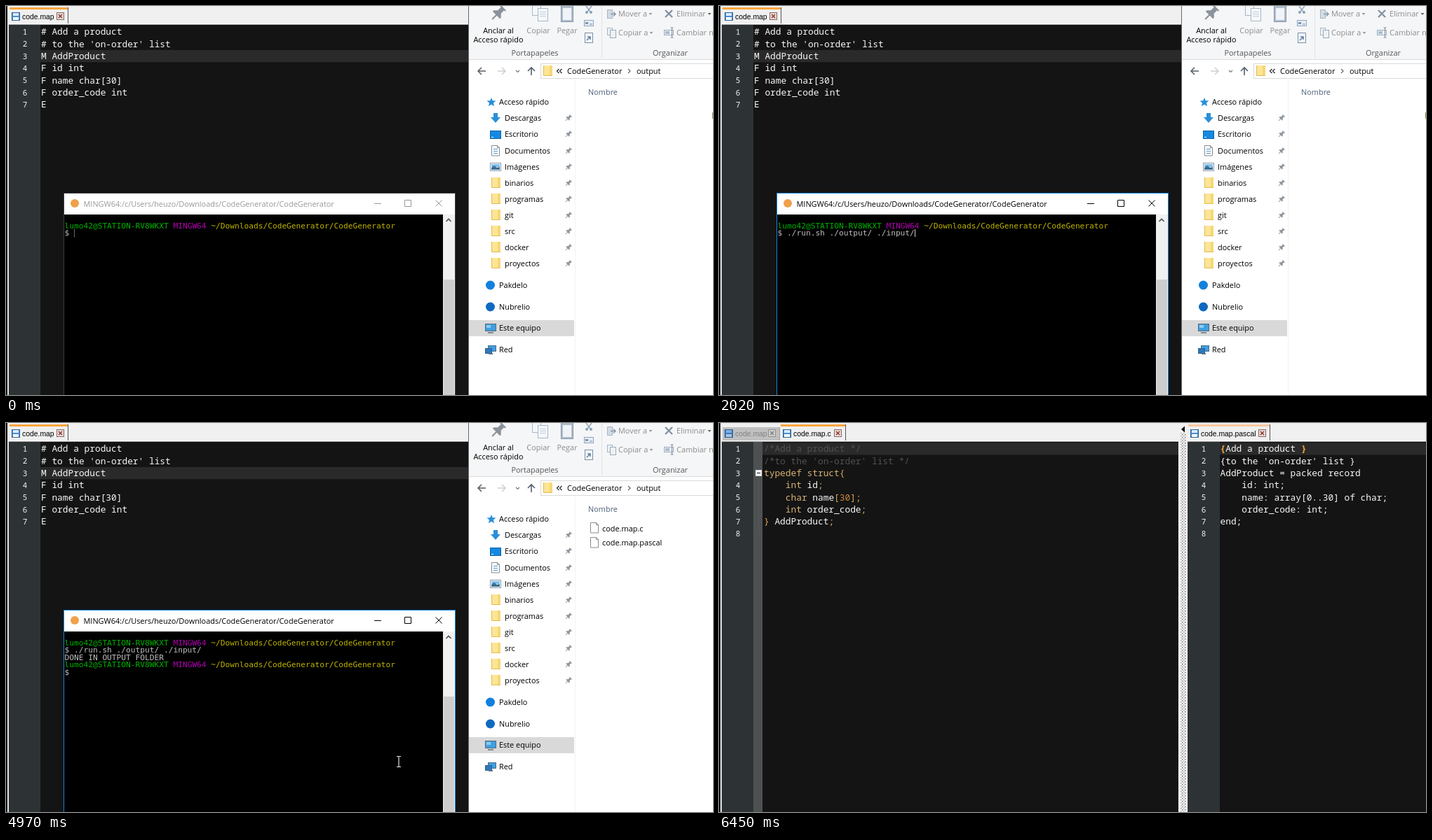
Write an HTML page that moves like this. It is 1008 px wide and 556 px high and loops after 8 s.

```html
<!DOCTYPE html>
<html lang="es">
<head>
<meta charset="utf-8">
<title>Code generator</title>
<style>
html, body { margin: 0; width: 100%; height: 100%; overflow: hidden; background: #141414; }
svg { display: block; width: 1008px; height: 556px; }
text { font: 10.92px "Open Sans", "Noto Sans", sans-serif; white-space: pre; }
.code { font: 12.83px "Noto Sans Mono", monospace; fill: #f8f8f8; }
.num { font: 11px "Noto Sans Mono", monospace; fill: #f4f4f4; text-anchor: middle; }
.term { font: 11.2px "DejaVu Sans Mono", monospace; fill: #bfbfbf; }
.tab { font: 10.4px "Liberation Sans", Arial, sans-serif; }
.mid { text-anchor: middle; }
.dim { fill: #8c8c8c; }
.group { fill: #555; text-anchor: middle; }
.key { fill: #d6b272; }
.op { fill: #dba95c; }
.val { fill: #c9843f; }
.note { fill: #555055; }
.brace { fill: #f9a83a; font-weight: bold; }
.user { fill: #00b400; }
.sys { fill: #b400b4; }
.path { fill: #bfb400; }
</style>
</head>
<body>
<svg id="stage" viewBox="0 0 1008 556"></svg>
<script>
const rect = (x, y, w, h, fill, more = '') =>
  `<rect x="${x}" y="${y}" width="${w}" height="${h}" fill="${fill}" ${more}/>`;
const frame = (x, y, w, h, fill, line) =>
  rect(x + .5, y + .5, w - 1, h - 1, fill, `stroke="${line}"`);
const line = (d, color, w = 1, more = '') =>
  `<path d="${d}" fill="none" stroke="${color}" stroke-width="${w}" ${more}/>`;
const shape = (d, fill) => `<path d="${d}" fill="${fill}"/>`;
const dot = (x, y, r, fill) => `<circle cx="${x}" cy="${y}" r="${r}" fill="${fill}"/>`;
// y is the middle of the line of text
const text = (x, y, s, cls = '', dy = 4) => `<text x="${x}" y="${y + dy}" class="${cls}">${s}</text>`;
const span = cls => s => `<tspan class="${cls}">${s}</tspan>`;
const group = (id, body) => `<g id="${id}">${body}</g>`;
const [key, op, val, note, brace, user, sys, path] =
  ['key', 'op', 'val', 'note', 'brace', 'user', 'sys', 'path'].map(span);

// ---- editor ----
const rowY = i => 37 + 17.33 * i;

function editor(x, end, margin, current, textX, lines, count = lines.length) {
  let s = rect(x, 0, end - x, 25, '#f0f0f0') + rect(x, 25, end - x, 1, '#fff') + rect(x, 26, end - x, 1, '#a0a0a0') +
    rect(x, 27, end - x, 529, '#141414') + rect(x, 27, margin - x, 529, '#2d3335') +
    rect(margin, rowY(current) - 8.7, end - margin, 17.33, '#2a2a2a');
  for (let i = 0; i < count; i++) s += text(x + 23, rowY(i), i + 1, 'num');
  lines.forEach((l, i) => s += text(textX, rowY(i), l, 'code', 4.3));
  return s;
}

function tab(x, end, label, top) {
  const w = end - x, y = top ? 2 : 6, ink = top ? '#000' : '#808080';
  const edge = top ? '#555' : '#a0a0a0', cx = end - 17;
  return rect(x, y, w, 25 - y, top ? '#f0f0f0' : '#c0c0c0') +
    (top ? rect(x, 2, w, 3, top) : '') + line(`M${end - .5} ${y}V25`, edge) +
    frame(x + 3, 9, 12, 12, top ? '#4a8fd0' : '#3c78c0', '#2f6194') +
    rect(x + 5, 10, 8, 4, top ? '#d8ecff' : '#7fb0e0') + rect(x + 5, 16, 8, 4, top ? '#fff' : '#a8c4e0') +
    text(x + 18, 15.5, label, 'tab', 3.5).replace('<text', `<text fill="${ink}"`) +
    frame(cx, 9, 11, 11, top ? '#e8dcd8' : '#d0d0d0', top ? '#8a6a64' : '#909090') +
    line(`M${cx + 3} 12l5 5m0-5l-5 5`, top ? '#8c3a30' : '#808080', 1.5);
}

const mapFile = editor(4, 659, 49, 2, 50, ['# Add a product', "# to the 'on-order' list",
  'M AddProduct', 'F id int', 'F name char[30]', 'F order_code int', 'E']) + tab(5, 89, 'code.map', '#faa53c');

// ---- file explorer ----
const folder = (x, y) => rect(x, y - 8, 13, 15, '#f7d774') + rect(x, y - 8, 9, 15, '#fce596') +
  line(`M${x + .5} ${y - 8}v14.5h12.5`, '#e3bb4f');
const page = (x, y) => shape(`M${x} ${y - 8}h8l4 4v12h-12z`, '#fff') +
  line(`M${x + .5} ${y - 7.5}h8l3 3v11.5h-11zM${x + 8.5} ${y - 7.5}v3h3`, '#8a8a8a');
const pin = (x, y, k = 1, c = '#8d959c') =>
  `<g transform="translate(${x} ${y}) rotate(45) scale(${k})">` +
  shape('M-2.5-5h5v1h-1v3l2 2v1h-7v-1l2-2v-3h-1zM-.5 2h1v4h-1z', c) + '</g>';
const screen = (x, y) => frame(x, y - 7, 16, 11, '#3f9fe0', '#5a6a78') +
  rect(x + 2, y - 5, 6, 4, '#8ccbf5') + rect(x + 4, y + 5, 8, 2, '#7c8a96');
const drop = (x, y, c = '#999') => shape(`M${x - 2.5} ${y - 1}h5l-2.5 3z`, c);

const ribbon = rect(660, 0, 348, 76, '#f5f6f7') + rect(660, 76, 348, 1, '#dadbdc') +
  rect(849, 0, 1, 74, '#e2e3e4') +
  pin(702, 10, 2.1, '#8a939b') +
  text(702, 35, 'Anclar al', 'mid') + text(702, 48, 'Acceso rápido', 'mid') + text(754, 67, 'Portapapeles', 'group') +
  frame(750, -3, 13, 17, '#f4f7fa', '#a9b7c6') + frame(758, 3, 15, 19, '#f4f7fa', '#a9b7c6') +
  line('M761 8.5h9m-9 3h9m-9 3h9', '#c0cddb') + text(759, 35, 'Copiar', 'mid dim') +
  frame(791, -2, 18, 25, '#aebccb', '#8596a8') + rect(794, 3, 12, 17, '#f0f4f8') + text(800, 35, 'Pegar', 'mid dim') +
  line('M827 0l6 8m2-8l-6 8', '#8aa0b6', 1.3) + dot(828, 9, 2, '#8aa0b6') + dot(834, 9, 2, '#8aa0b6') +
  frame(824, 20, 14, 9, '#e8eef5', '#8ea6bf') + line('M826 23l1 3l1-3l1 3l1-3m2 3h4', '#6d88a5') +
  frame(825, 38, 12, 15, '#f4f7fa', '#7890a8') + line('M828 49l5-5m-4 0h4v4', '#5f7f9f', 1.5) +
  frame(857, 5, 8, 13, '#d4dce4', '#aab6c2') + line('M862 11.5h7m-3-3l3 3l-3 3', '#8799ab', 1.5) +
  text(873, 11, 'Mover a', 'dim') + drop(919, 11) +
  frame(857, 31, 8, 11, '#eef2f6', '#aab6c2') + frame(861, 34, 9, 12, '#eef2f6', '#9aaabb') +
  text(873, 38, 'Copiar a', 'dim') + drop(920, 38) +
  line('M940 6l10 10m0-10l-10 10', '#8592a3', 2.4) + text(956, 11, 'Eliminar', 'dim') + drop(1003, 11, '#666') +
  frame(938, 34, 14, 8, '#eef2f6', '#9aaabb') + rect(940, 36, 6, 4, '#a8bdd2') + line('M949.5 31v14m-2-14h4m-4 14h4', '#7e8c9a') +
  text(956, 38, 'Cambiar nombre', 'dim') + text(947, 67, 'Organizar', 'group');

const address = line('M684 93h-11m5-5l-5 5l5 5', '#555f6a', 1.5) + line('M701 93h11m-5-5l5 5l-5 5', '#d0d0d0', 1.5) +
  line('M727 92l2.5 2.5l2.5-2.5', '#777', 1.2) + line('M749 99v-11m-5 5l5-5l5 5', '#555f6a', 1.6) +
  frame(762, 82, 260, 22, '#fff', '#d9d9d9') + folder(766, 93) +
  line('M788.5 90l-3 3l3 3m4-6l-3 3l3 3', '#222', 1.2) + text(800, 93, 'CodeGenerator') +
  line('M887 90l3 3l-3 3', '#666', 1.2) + text(899, 93, 'output');

const links = [
  ['Descargas', 160, shape('M695 153h6v6h4l-7 8l-7-8h4z', '#2b8fd8')],
  ['Escritorio', 183, frame(690, 178, 16, 12, '#1589e0', '#0c65ad') + rect(692, 187, 3, 1, '#fff')],
  ['Documentos', 207, page(692, 207) + line('M695 204.5h6m-6 3h6m-6 3h6', '#4a90c8')],
  ['Imágenes', 230, frame(690, 224, 16, 12, '#fff', '#8899a8') + rect(692, 226, 12, 4, '#7fc0ee') +
    shape('M692 234v-3l4-3l4 3l4-1v4z', '#3b6f94')],
  ...['binarios', 'programas', 'git', 'src', 'docker', 'proyectos'].map((s, i) =>
    [s, 253 + 23 * i, folder(692, 253 + 23 * i)])
];
const tops = [['Pakdelo', 399], ['Nubrelio', 430], ['Este equipo', 460], ['Red', 491]];
const sidebar = rect(660, 449, 150, 23, '#d9d9d9') + rect(660, 480, 150, 23, '#e5f3ff', 'id="hover"') +
  shape('M692 131l1.8 4.2l4.7.4l-3.6 3l1.2 4.6l-4.1-2.4l-4.1 2.4l1.2-4.6l-3.6-3l4.7-.4z', '#2a8fdb') +
  text(703, 137, 'Acceso rápido') +
  links.map(([s, y, icon]) => icon + text(711, y, s) + pin(802, y, .95)).join('') +
  tops.map(([s, y]) => text(703, y, s)).join('') +
  dot(690.5, 399, 6.5, '#1081de') + dot(690.5, 430, 6.5, '#1069c0') + screen(683, 461) +
  frame(687, 485, 12, 9, '#3f9fe0', '#4a7090') + frame(683, 489, 10, 8, '#2a78c0', '#3a6080') + rect(688, 496, 6, 2, '#5a7488') +
  group('arrows', line('M667.5 135.5l3.5 3.5l3.5-3.5' + tops.map(([, y]) => `M669 ${y - 3.5}l3.5 3.5l-3.5 3.5`).join(''), '#8c8c8c', 1.1));

const explorer = rect(659, 0, 1, 556, '#6a6a6a') + rect(660, 0, 348, 556, '#fff') + ribbon + address + sidebar +
  rect(811, 106, 1, 450, '#f2f2f2') + text(830, 123, 'Nombre').replace('<text', '<text fill="#4c607a"') +
  rect(1007, 152, 1, 9, '#8a8a40', 'id="empty"') +
  group('files', ['code.map.c', 'code.map.pascal'].map((s, i) =>
    page(833, 150 + 21 * i) + text(850, 150.5 + 20.5 * i, s)).join(''));

// ---- terminal ----
const termY = i => 314 + 10.5 * i;
const prompt = user('lumo42@STATION-RV8WKXT') + ' ' + sys('MINGW64') + ' ' + path('~/Downloads/CodeGenerator/CodeGenerator');
const row = (i, s) => text(83.5, termY(i), s, 'term', 3.6);
const terminal = rect(82.5, 267.5, 558, 300, '#fff', 'id="border"') +
  dot(98, 282, 6, '#f0a04b') +
  group('title', text(110.5, 282.5, 'MINGW64:/c/Users/heuzo/Downloads/CodeGenerator/CodeGenerator') +
    line('M525 282.5h10M568.5 277.5h9v9h-9zM612.5 277.5l9 9m0-9l-9 9', 'currentColor')) +
  rect(83, 298, 540, 258, '#000') + rect(623, 298, 17, 258, '#f0f0f0') + rect(624, 391, 15, 165, '#cdcdcd') +
  line('M627.5 308l3.5-3.5l3.5 3.5', '#505050', 1.6) +
  row(0, prompt) + row(1, '$') +
  group('command', row(1, '  ./run.sh ./output/ ./input/')) +
  group('done', row(2, 'DONE IN OUTPUT FOLDER')) +
  group('again', row(3, prompt) + row(4, '$')) +
  line('M.5 0v11', '#d0d0d0', 1, 'id="caret"');

const pointers = group('beam', line('M-3 -7.5h2.5l.5 .5l.5-.5h2.5M0-7v14M-3 7.5h2.5l.5-.5l.5 .5h2.5', '#e6e6e6', 1.2)) +
  group('arrow', '<path d="M0 0v16l4-3.6l2.8 6.4l2.6-1.2l-2.8-6h5.4z" fill="#fff" stroke="#000"/>');

// ---- generated files ----
const cLines = [note('/*Add a product */'), note("/*to the 'on-order' list */"), key('typedef struct') + op('{'),
  '    ' + key('int') + ' id' + op(';'), '    ' + key('char') + ' name' + op('[') + val('30') + op('];'),
  '    ' + key('int') + ' order_code' + op(';'), op('}') + ' AddProduct' + op(';')];
const pascalLines = [brace('{') + 'Add a product ' + brace('}'), "{to the 'on-order' list }", 'AddProduct = packed record',
  '    id: int;', '    name: array[0..30] of char;', '    order_code: int;', 'end;'];
const results = editor(4, 655, 49, 0, 64, cLines, 8) +
  rect(49, 27, 13, 529, 'url(#hatch)') + line('M56.5 76v82.5h5', '#555') +
  frame(52, 67, 9, 9, '#fff', '#ddd') + rect(54, 71, 5, 1, '#000') +
  tab(5, 87, 'code.map') + tab(88, 181, 'code.map.c', '#faa53c') +
  rect(655, 0, 14, 556, '#f0f0f0') + rect(655, 27, 3, 529, '#fff') + rect(658, 14, 8, 542, 'url(#dots)') +
  shape('M664 4.5v9l-5-4.5z', '#000') + rect(666, 27, 2, 529, '#fff') +
  editor(668, 1008, 714, 0, 714.5, pascalLines, 8) + tab(669, 786, 'code.map.pascal', '#fac8a0');

const stage = document.getElementById('stage');
stage.innerHTML = '<defs><pattern id="hatch" width="2" height="2" patternUnits="userSpaceOnUse">' +
  rect(0, 0, 2, 2, '#303638') + rect(0, 0, 1, 1, '#6c6c6c') + rect(1, 1, 1, 1, '#6c6c6c') + '</pattern>' +
  '<pattern id="dots" width="4" height="4" patternUnits="userSpaceOnUse">' +
  rect(0, 0, 4, 4, '#f4f4f4') + rect(0, 0, 1.5, 1.5, '#777') + rect(2, 2, 1.5, 1.5, '#aaa') + '</pattern></defs>' +
  rect(0, 0, 2, 556, '#141414') + rect(2, 0, 2, 556, '#e4e4e4') +
  group('work', mapFile + explorer + terminal + pointers) + group('results', results);

// ---- timeline: [start, ...state] ----
const caretSteps = [[0, 97, 319, 'dots'], [610, 97, 319, 'on'], [1300], [1470, 97, 319, 'on'], [2020, 279, 319, 'on'],
  [2550], [2860, 84, 330, 'on'], [2935, 84, 341, 'on'], [3010, 97, 351, 'on'], [3560], [4110, 97, 351, 'on'],
  [4970], [5590, 97, 351, 'on'], [6130], [6290, 97, 351, 'dots']];
const mouseSteps = [[0], [140, 'arrow', 772, 495], [217, 'arrow', 668, 488], [293, 'beam', 545, 462], [370, 'beam', 467.5, 447.5],
  [1470], [4035, 'beam', 516, 480], [4970, 'beam', 560, 484], [5046, 'arrow', 672, 495], [5123, 'arrow', 790, 535], [5200]];
const arrowSteps = [[0, 0], [140, .4], [217, .8], [293, .5], [370, 0], [5046, .3], [5123, .7], [5200, 1],
  [5350, .85], [5440, .65], [5590, .4], [5670, .2], [5820, 0]];
const at = (steps, t) => steps.findLast(s => s[0] <= t).slice(1);

const $ = id => document.getElementById(id);
const show = (id, on) => $(id).style.display = on ? '' : 'none';
const move = (id, x, y) => $(id).setAttribute('transform', `translate(${x} ${y})`);

function draw(now) {
  const t = now % 8000;
  const active = t >= 610 && t < 6290;
  show('work', t < 6450);
  show('results', t >= 6450);
  show('command', t >= 2020);
  show('done', t >= 2935);
  show('again', t >= 3010);
  show('files', t >= 3960);
  show('empty', t < 3960);
  show('hover', t >= 140 && t < 293 || t >= 5046 && t < 5123);
  $('arrows').style.opacity = at(arrowSteps, t)[0];
  $('border').setAttribute('stroke', active ? '#1883d7' : '#3c3c3c');
  $('title').setAttribute('fill', active ? '#000' : '#999');
  $('title').setAttribute('color', active ? '#000' : '#999');

  const [cx, cy, mode] = at(caretSteps, t);
  show('caret', mode);
  if (mode) {
    move('caret', cx, cy);
    $('caret').setAttribute('stroke-dasharray', mode === 'dots' ? '1 1' : 'none');
  }
  const [kind, mx, my] = at(mouseSteps, t);
  show('beam', kind === 'beam');
  show('arrow', kind === 'arrow');
  if (kind) move(kind, mx, my);
}

const start = performance.now();
function tick() {
  draw(performance.now() - start);
  requestAnimationFrame(tick);
}
draw(0);
requestAnimationFrame(tick);
</script>
</body>
</html>
```
